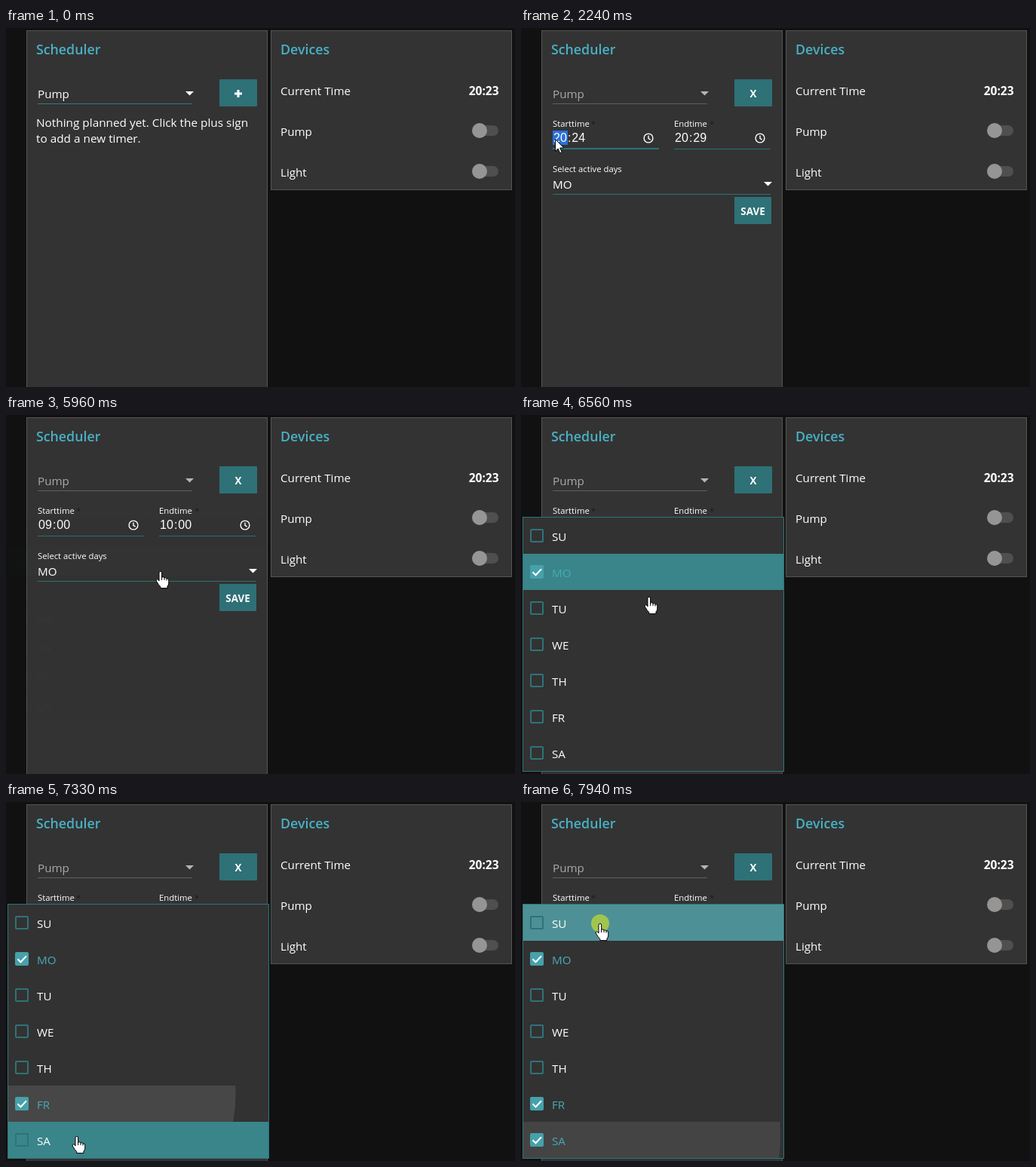
An HTML page that plays this animation: 675x476 px, repeating every 8 s.

```html
<!DOCTYPE html>
<html lang="en">
<head>
<meta charset="utf-8">
<title>Scheduler</title>
<style>
  html, body { margin: 0; width: 100%; height: 100%; overflow: hidden; background: #111; }
  svg { display: block; width: 675px; height: 476px; }
  text { font: 15.2px "Open Sans", "Noto Sans", sans-serif; fill: #fff; white-space: pre; }
  .title { font-size: 17.8px; font-weight: 600; fill: #48b0c4; }
  .note { font-size: 15.35px; }
  .label { font-size: 11.3px; }
  .star { font-size: 11.3px; fill: #1f1c1c; }
  .clock { font-size: 15.5px; font-weight: 700; text-anchor: end; }
  .btn { font-size: 13.4px; font-weight: 700; text-anchor: middle; }
  .time text { font: 16px "Liberation Sans", Arial, sans-serif; }
  .panel { fill: #333; stroke: #555; }
  .teal { fill: #2e7176; }
</style>
</head>
<body>
<svg viewBox="0 0 675 476" xmlns="http://www.w3.org/2000/svg">
  <rect width="675" height="476" fill="#111"/>
  <rect class="panel" x="27.5" y="3.5" width="319" height="500"/>
  <rect class="panel" x="351.5" y="3.5" width="319" height="211"/>
  <text class="title" x="40" y="34.5">Scheduler</text>
  <text class="title" x="364" y="34.5">Devices</text>
  <text x="364" y="89">Current Time</text>
  <text class="clock" x="653.5" y="89">20:23</text>
  <g id="switches"></g>

  <text id="device" x="42" y="93">Pump</text>
  <rect id="deviceLine" x="42" y="100" width="205" height="1"/>
  <path id="deviceArrow" d="M238 84h11l-5.5 5.5z"/>
  <rect class="teal" x="283" y="68" width="50" height="36" rx="1"/>

  <g id="empty">
    <path d="M308 82v10M303 87h10" stroke="#fff" stroke-width="3"/>
    <text class="note" x="40" y="131">Nothing planned yet. Click the plus sign</text>
    <text class="note" x="40" y="152">to add a new timer.</text>
  </g>

  <g id="form">
    <text class="btn" x="308" y="92">X</text>
    <g id="fields"></g>
    <text class="label" x="42" y="191">Select active days</text>
    <text x="42" y="213">MO</text>
    <path d="M322 204h11l-5.5 5.5z" fill="#fff"/>
    <rect class="teal" x="42" y="220" width="289" height="1"/>
    <rect class="teal" x="283" y="224" width="49" height="36" rx="1"/>
    <text class="btn" x="307.5" y="248">SAVE</text>
  </g>

  <g id="menu">
    <rect x="2.5" y="135.5" width="346" height="337" fill="#323232" stroke="#2d757a"/>
    <clipPath id="rowClip"><rect x="3" y="0" width="345" height="48"/></clipPath>
    <g id="rows"></g>
  </g>

  <circle id="press" r="12" fill="#ff0" opacity=".47"/>
  <g id="cursor" stroke="#000" fill="#fff" stroke-linejoin="round">
    <path id="arrow" d="M.5.5V16.5L4.2 13 6.7 18.8 9.2 17.7 6.7 12H11.8Z"/>
    <g id="hand">
      <path d="M-2 2Q-2 .3-.2 .3Q1.6 .3 1.6 2V8.2Q4.6 6.8 5 9Q7.6 7.8 8 10Q10.8 9 10.8 12V16Q10.6 18.5 9 20V22.6H-.2V20.6Q-3 18-5.6 13.2Q-6.4 11.2-4.6 10.8Q-3.2 10.8-2 13Z"/>
      <path d="M1.6 8v4M5 9v3M8 10v2.6" fill="none"/>
    </g>
  </g>
</svg>
<script>
const LOOP = 8000, STEP = 77, MOVE_START = 760, FORM_AT = 1300;
const $ = id => document.getElementById(id);
const set = (el, attrs) => { for (const k in attrs) el.setAttribute(k, attrs[k]); };
const show = (el, on) => { el.style.display = on ? "" : "none"; };
const within = (t, a, b) => t >= a && t < b;
const clamp = v => Math.max(0, Math.min(1, v));
// Latest value of a [time, value] list
const at = (list, t) => list.reduce((v, [from, next]) => t >= from ? next : v, null);

// Cursor path: time, x, y
const path = [
  [760, 298, 2], [1070, 308, 87], [1300, 308, 87], [1540, 257, 110],
  [1990, 45, 147], [2900, 45, 147], [3400, 120, 162], [3630, 165, 156],
  [3920, 205, 148], [4900, 205, 148], [5300, 204, 194], [5370, 205, 207],
  [6000, 205, 207], [6530, 170, 241], [6620, 164, 247], [6690, 155, 256],
  [6850, 107, 387], [7100, 107, 387], [7240, 94, 443], [7560, 94, 443],
  [7640, 96, 412], [7850, 105, 161], [8000, 105, 161]
];
const presses = [[1220, 1300], [2160, 2240], [4010, 4090], [5410, 5480],
  [7020, 7100], [7480, 7560], [7930, 8000]];
const hands = [[1000, 1390], [5250, 8000]];

// Time fields: [time, [hour, minute, selected part]]
const fields = [
  { label: "Starttime", x: 42, width: 141, icon: 169, steps: [
    [0, ["20", "24", ""]], [2240, ["20", "24", "h"]], [2690, ["00", "24", "h"]],
    [2860, ["09", "24", "m"]], [3090, ["09", "00", "m"]], [4010, ["09", "00", ""]]] },
  { label: "Endtime", x: 203, width: 128, icon: 317, steps: [
    [0, ["20", "29", ""]], [4090, ["20", "29", "h"]], [4560, ["01", "29", "h"]],
    [4715, ["10", "29", "m"]], [4870, ["10", "00", "m"]], [5410, ["10", "00", ""]]] }
];

const days = ["SU", "MO", "TU", "WE", "TH", "FR", "SA"];
const checkedAt = { MO: 0, FR: 7100, SA: 7560 };
const hover = [[0, 1], [6640, 2], [6700, 3], [6790, 4], [6860, 5], [7250, 6],
  [7640, 5], [7700, 3], [7780, 1], [7850, 0]];
const ripples = { FR: [7100, 107, 12], SA: [7560, 94, 19] };

$("switches").innerHTML = ["Pump", "Light"].map((name, i) => {
  const y = 136 + 54 * i;
  return `<text x="364" y="${y + 7}">${name}</text>
    <rect x="619" y="${y - 7}" width="34" height="14" rx="7" fill="#4f4f4f"/>
    <circle cx="628" cy="${y}" r="10" fill="#979494"/>`;
}).join("");

$("fields").innerHTML = fields.map(({ label, x, width, icon }) => `<g class="time">
  <rect class="sel" y="136" width="20" height="19" fill="#2a6fdb"/>
  <text class="h" x="${x + 1}" y="151"></text>
  <text x="${x + 20}" y="151">:</text>
  <text class="m" x="${x + 25.3}" y="151"></text>
  <rect class="line teal" x="${x}" width="${width}"/>
  <g fill="none" stroke="#fff" stroke-width="1.4">
    <circle cx="${icon}" cy="146" r="5.9"/><path d="M${icon} 142.4v4l2.6 1.8"/>
  </g></g>
  <text class="label" x="${x}" y="131">${label}</text>
  <text class="star" x="${x + (label === "Endtime" ? 47 : 51)}" y="131">*</text>`).join("");

$("rows").innerHTML = days.map((day, i) => `<g transform="translate(0 ${136 + 48 * i})">
  <g clip-path="url(#rowClip)">
    <rect class="bg" x="3" width="345" height="48" fill="#39858a"/>
    <circle class="ripple" fill="#fff" opacity=".1"/>
  </g>
  <rect class="box" x="13" y="16" width="16" height="16" rx="1" stroke-width="2"/>
  <path class="tick" d="M15.5 24.3l4 4 7.5-8" fill="none" stroke="#fff" stroke-width="2"/>
  <text x="41" y="31">${day}</text></g>`).join("");

const fieldEls = [...document.querySelectorAll(".time")];
const rowEls = [...$("rows").children];

function cursorAt(t) {
  const s = MOVE_START + Math.floor((t - MOVE_START) / STEP) * STEP;
  const i = Math.max(1, path.findIndex(p => p[0] > s));
  const [a, b] = [path[i - 1], path[i]];
  const k = clamp((s - a[0]) / (b[0] - a[0]));
  return [1, 2].map(n => Math.round(a[n] + (b[n] - a[n]) * k));
}

function drawField(el, field, t) {
  const [h, m, part] = at(field.steps, t);
  const q = name => el.querySelector("." + name);
  q("h").textContent = h;
  q("m").textContent = m;
  show(q("sel"), part);
  set(q("sel"), { x: field.x + (part === "m" ? 24.3 : 0) });
  set(q("line"), part ? { y: 159, height: 2 } : { y: 160, height: 1 });
}

function drawRow(el, i, t) {
  const day = days[i], on = t >= checkedAt[day], hot = at(hover, t) === i;
  const q = name => el.querySelector("." + name);
  show(q("bg"), hot);
  show(q("tick"), on);
  set(q("box"), { fill: on ? "#46a1aa" : "none", stroke: on ? "#46a1aa" : "#2f7378" });
  el.querySelector("text").style.fill = on ? "#4aa8b3" : "#fff";

  const ripple = q("ripple");
  if (day === "SU") {
    set(ripple, { cx: 105, cy: 25, r: 260, opacity: t >= 7930 ? .1 : 0 });
  } else if (ripples[day]) {
    const [start, cx, cy] = ripples[day], age = t - start;
    const fade = clamp((500 - age) / 140);
    set(ripple, { cx, cy, r: Math.min(250, Math.max(0, age * .855)), opacity: .1 * fade });
    if (age < 0) set(ripple, { opacity: 0 });
  }
}

function draw(t) {
  const open = t >= FORM_AT;
  show($("empty"), !open);
  show($("form"), open);
  $("device").style.fill = open ? "#aaa" : "#fff";
  set($("deviceArrow"), { fill: open ? "#b5b5b5" : "#fff" });
  set($("deviceLine"), { fill: open ? "#606060" : "#2e7d80" });
  fieldEls.forEach((el, i) => drawField(el, fields[i], t));

  const k = clamp((t - 5960) / 110);
  show($("menu"), k > 0);
  set($("menu"), { opacity: k, transform: `translate(0 ${135 * .2 * (1 - k)}) scale(1 ${.8 + .2 * k})` });
  rowEls.forEach((el, i) => drawRow(el, i, t));

  const [x, y] = cursorAt(t), hand = hands.some(([a, b]) => within(t, a, b));
  show($("cursor"), t >= MOVE_START);
  set($("cursor"), { transform: `translate(${x} ${y})` });
  show($("hand"), hand);
  show($("arrow"), !hand);
  show($("press"), presses.some(([a, b]) => within(t, a, b)));
  set($("press"), { cx: x, cy: y });
}

const begin = performance.now();
function tick() {
  draw((performance.now() - begin) % LOOP);
  requestAnimationFrame(tick);
}
tick();
</script>
</body>
</html>
```
